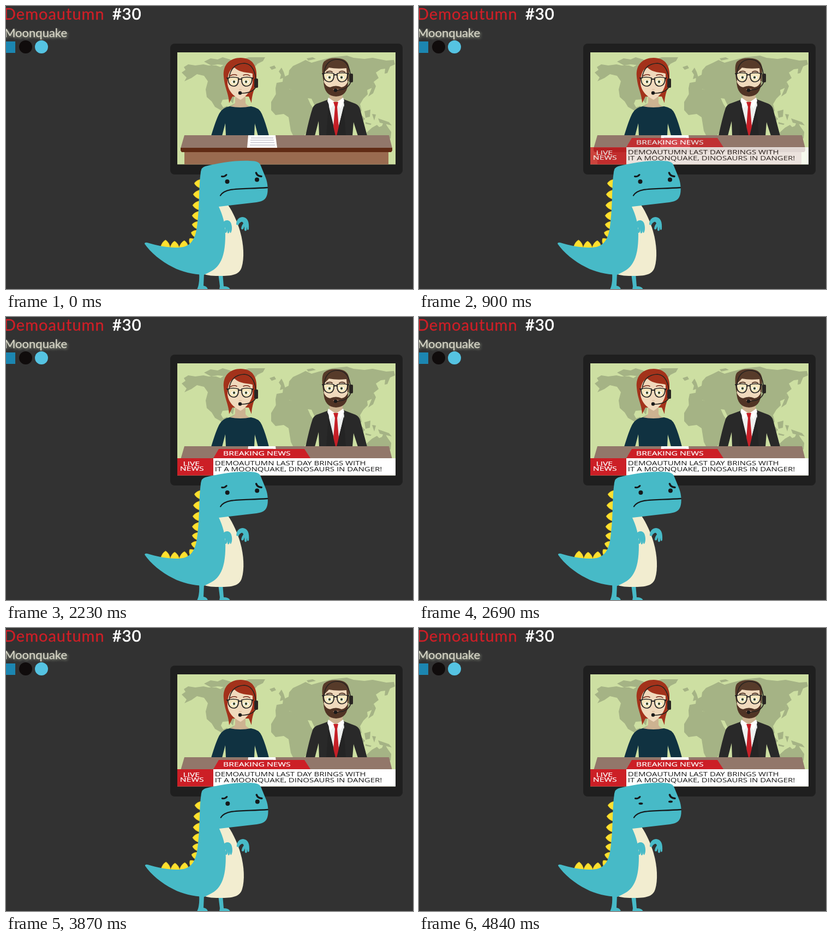
Write an HTML page that moves like this. It is 746 px wide and 519 px high and loops after 4.91 s.

```html
<!DOCTYPE html>
<html lang="en">
<head>
<meta charset="utf-8">
<title>Breaking news</title>
<style>
  html, body { margin: 0; height: 100%; overflow: hidden; background: #323232; }
  svg { display: block; width: 746px; height: 519px; }
  .head { font-family: Lato, sans-serif; }
  .sub { filter: drop-shadow(2px 2px 2px #8a8f80); }
  .news { font-family: "Open Sans", "Noto Sans", sans-serif; }
  .line { fill: none; stroke-linecap: round; stroke-linejoin: round; }
</style>
</head>
<body>
<svg viewBox="0 0 746 519">
  <defs>
    <clipPath id="screen"><path d="M314 85h400v205.500h-400z"/></clipPath>
    <g id="glasses">
      <g fill="#f5e6bd" stroke="#242323" stroke-width="1.700">
        <path d="M-22 -7q9 -3 19 0q1 14 -8 15q-11 0 -11 -15zM22 -7q-9 -3 -19 0q-1 14 8 15q11 0 11 -15z"/>
      </g>
      <path class="line" d="M-3 -4q3 -2 6 0M-22 -6l-2 -1M22 -6l2 -1" stroke="#242323" stroke-width="2"/>
      <g fill="#fff"><ellipse cx="-11" rx="5" ry="3"/><ellipse cx="11" rx="5" ry="3"/></g>
      <g fill="#55653c"><circle cx="-11" r="2.400"/><circle cx="11" r="2.400"/></g>
      <g fill="#222"><circle cx="-11" r="1.100"/><circle cx="11" r="1.100"/></g>
    </g>
  </defs>

  <g class="head">
    <text x="-4" y="24.500" font-size="29" letter-spacing="1" fill="#cf1f27" stroke="#cf1f27" stroke-width=".3">Demoautumn</text>
    <text x="195" y="24.500" font-size="29" letter-spacing="1" fill="#fff" stroke="#fff" stroke-width=".7">#30</text>
    <text class="sub" x="-3" y="57" font-size="22" fill="#d6d5c6" stroke="#d6d5c6" stroke-width=".3">Moonquake</text>
  </g>
  <path d="M-4 65h21v21h-21z" fill="#1c86b1"/>
  <circle cx="36" cy="75" r="12" fill="#100c0c"/>
  <circle cx="65" cy="75" r="12" fill="#55c3e2"/>

  <rect x="301" y="69" width="426" height="240" rx="8" fill="#1f1f1f"/>
  <g clip-path="url(#screen)">
    <path d="M314 85h400v206h-400z" fill="#cddfa2"/>
    <g fill="#a5b385">
      <path d="M322 122l7-5-3-5 8-5 13 2 15-2 9 2 14 0 8 3 6-4 18 4 8 12 22 3 6 8-13 8-9 4-6 11-7 10-2 11-7-8-12 1-3 7 4 7 8-3-1 8 10 7-6 3-12-8-14-8-6-10-9-8-2-14 4-15-7-10-13-3-10 7-13 6 4-7z"/>
      <path d="M363 102l12-6 13 2 9-4 14 4 10 8-15 3-18-2-12 2zM432 98l13-4 30 0-4 7-10 5-13 15-9-3-1-14z"/>
      <path d="M410 183l14-6 19 5 7 8 18 7-2 14-13 10-8 17-13 13-6-28-15-20z"/>
      <path d="M486 176l11-18 17-6 14 2 3 6 19 2 8 18 4 6 10 1-11 19-4 17-13 18-12 8-10-20-4-25-9-6-15 2-8-9z"/>
      <path d="M494 151l2-10 11-2 1-8 10-5 1-8 7-8 13-6 10-5 11 5 14-4 23-6 28-3 12 4 20 2 15-2 25 5 14-1 2 8-9 4-5 12-5 1 1-9-8 1-9 6 5 10-9 7-3 11-9 4 1 8-8 8-6 10 3 12-4 5-8-13-7-8-9 12-3 14-7-9-5-14-15-5-5 15-14 8-9-14-6-13-7-1-13-1-2-7-6 2-8-9-5-2 6 11-3 2-9-10-9 3-9 8z"/>
      <path d="M500 120l5-7 4 8 3 10-10 3 2-8zM483 112l9-3 3 5-8 3zM551 96l11-2 6 3-14 3zM671 149l3-10 4 8-5 13-9 6zM564 205l5 4-4 15-5 2z"/>
      <path d="M638 187l10 9 10 11-4 4-14-15zM657 193l11-3-1 13-8 2zM671 198l7 1-3 11zM682 206l20 7 5 6-22-5zM661 232l10-9 9-5 4 4 5-2 4-9 6 10 7 10-1 12h-44zM659 213l11 3-2 2-9-2z"/>
    </g>

    <!-- woman -->
    <path d="M409 178c-1-19-8-26-10-49c-2-22 12-34 31-34c21 0 31 14 29 37c-1 19-8 25-9 46l-5-12h-30z" fill="#a3321b"/>
    <path d="M420 163h19v15q3 6 12 7q-21 13-43 0q10-2 12-8z" fill="#cdb391"/>
    <path d="M406 133q1-17 13-20q8 9 33 10v18q-3 19-22 31q-21-10-24-29z" fill="#f0d9bc"/>
    <path d="M406 137q1-23 20-31q14 16 29 19l-1-14-16-12-20 2-13 14z" fill="#a3321b"/>
    <path d="M376 238q9-30 15-41q6-11 19-13q20 4 39 0q15 2 20 14q7 16 13 40h-20l-6-23-1 23h-52l-1-23-6 23z" fill="#103241"/>
    <use href="#glasses" x="429" y="139"/>
    <path class="line" d="M409 132q3-26 28-27q17 1 21 28M459 146q-5 14-28 14" stroke="#29251f" stroke-width="1.700"/>
    <rect x="455" y="133" width="7" height="17" rx="2" fill="#292522"/>
    <circle cx="429" cy="159.500" r="3.200" fill="#191919"/>
    <path class="line" d="M411 128q7-4 12-1M435 127q7-3 12 1" stroke="#732718" stroke-width="1.500"/>
    <path d="M427 153h5" stroke="#d9b293"/>

    <!-- man -->
    <path d="M581 133q-4-27 3-32q9-7 27-5q16 2 18 17l-1 25h-46z" fill="#573b2a"/>
    <path d="M593 155h24v19l-12 8-12-9z" fill="#cdb391"/>
    <path d="M583 122q5-5 9-9q14 3 32 1l2 25q-3 22-21 27q-20-6-22-27z" fill="#f0d9bc"/>
    <path d="M582 138q4 10 12 11q11-5 21 0q8-1 12-11q0 27-22 28q-22-1-23-28z" fill="#513425"/>
    <path d="M599 153q6-3 12 0q-6 4-12 0z" fill="#d29a83"/>
    <path d="M549 238q7-33 13-51q3-7 11-9l19-7 13 8 14-8 21 8q7 3 9 10l13 49h-17l-8-25-2 25h-61l-1-27-7 27z" fill="#292929"/>
    <path d="M591 170l13 10 14-10 2 12-15 56-13-53z" fill="#eef0ef"/>
    <path d="M591 168l13 9-9 11-6-14zM618 168l-13 9 8 11 7-14z" fill="#fff"/>
    <path d="M600 176h9l-2 9 4 49-6 5-6-5 4-49z" fill="#c51f27"/>
    <path d="M591 183l13 55h-17zM619 183l-13 55h17z" fill="#242424"/>
    <use href="#glasses" x="604" y="131"/>
    <path class="line" d="M583 124q2-24 22-26q22-1 26 26M632 139q-6 16-27 15" stroke="#292420" stroke-width="1.700"/>
    <rect x="629" y="124" width="7" height="16" rx="2" fill="#292522"/>
    <circle cx="604" cy="154.500" r="3.200" fill="#191919"/>
    <path class="line" d="M588 121q6-3 10 0M611 121q5-3 10 0" stroke="#513425" stroke-width="2"/>

    <path d="M327 266h374v25h-374z" fill="#996b50"/>
    <path d="M327 237h375l6 24h-388z" fill="#92776a"/>
    <path d="M320 260h388v5l-2 3h-384l-2-3z" fill="#602b15"/>
    <path d="M444 237h50l3 23h-55z" fill="#fff"/>
    <path d="M449 242h41M448 246h43M448 250.500h44M447 255h46" stroke="#c5c3cd" stroke-width="1.500"/>

    <g id="banner">
      <path d="M380 259h334v32h-334z" fill="#fff"/>
      <path d="M314 259h66l10-17h157l11 17h-178v32h-66z" fill="#cc1f26"/>
      <g class="news" transform="translate(314 0) scale(1.390 1)" font-size="10.800" fill="#171717">
        <text x="49.500" y="272.300">DEMOAUTUMN LAST DAY BRINGS WITH</text>
        <text x="49.500" y="282.600">IT A MOONQUAKE, DINOSAURS IN DANGER!</text>
        <g font-size="11.300" fill="#fff" stroke="#fff" stroke-width=".2">
          <text x="60.500" y="254.500">BREAKING NEWS</text>
          <text x="7.500" y="273">LIVE</text>
          <text x="3.500" y="281.700">NEWS</text>
        </g>
      </g>
    </g>
  </g>

  <g fill="#47bac7">
    <path d="M354 490h9l-1 23q7 1 8 7h-20l2-5q3-10 2-25zM389 490h8l2 24q10 0 12 6h-20l1-6z"/>
    <g id="body">
      <g id="spikes" fill="#ffe02e" stroke="#c9a820" stroke-width=".5"></g>
      <path d="M389 366l18-1c9 13 17 31 22 48c7 24 8 50 3 66c-4 12-13 16-37 16c-14 0-27 0-35-5z" fill="#f2edd0"/>
      <path d="M357 304q1-8 8-10c27-6 51-11 82-10c13 0 18 3 20 9l9 22c4 10 5 25 2 33c-3 8-8 10-19 12l-69 8c7 15 12 31 12 52c0 22-3 40-10 51c-6 11-16 16-29 22c-21-1-40-5-57-14c-22-11-41-27-52-43q0-3 5-2c22 7 53 12 69 7c17-6 21-24 23-45c4-33 2-64 6-92z"/>
      <path d="M397 398c4-7 14-7 16 2c2 7 1 13-1 16q-2 1-2-6q0 7-3 7q-2-1-1-8q-1 8-4 7q-2-2 0-9l-4-3zM422 401c0-9 5-14 12-14c9 1 12 9 11 22q-1 3-3 1l-1-5 0 6q-2 3-4 0l0-7-2 5q-3 2-4-1q1-6 4-9q-1-4-4-3q-4 2-5 6z"/>
      <g class="line" stroke="#15191b">
        <path d="M395.500 312.500q5 1 8.500-3" stroke-width="3"/>
        <path d="M458.500 306q2 6 9.500 6.500" stroke-width="3.600"/>
        <path d="M393 347.500c10-16 42-11 86-14.500" stroke-width="2.300"/>
      </g>
      <g fill="#15191b">
        <ellipse class="eye" cx="405.500" cy="322" rx="4" ry="4"/>
        <ellipse class="eye" cx="460" cy="318.500" rx="4" ry="4"/>
      </g>
    </g>
  </g>
</svg>
<script>
  const LOOP = 4910;
  const $ = id => document.getElementById(id);
  const eyes = document.querySelectorAll('.eye');

  // back spikes: x, y and tilt in degrees; tips point up before tilting
  const spikes = [[357, 326, -85], [355, 346, -87], [354, 366, -87], [353, 385, -87],
    [351, 402, -82], [349, 418, -75], [343, 434, -40], [326, 442, 5], [309, 443, 0], [292, 441, 2]];
  $('spikes').innerHTML = spikes.map(([x, y, a], i) => {
    const s = i > 3 && i < 7 ? .85 : 1;
    return `<path transform="translate(${x} ${y}) rotate(${a}) scale(${s})"
      d="M-9 2Q-6 -9 0 -12Q7 -8 9 2z"/>`;
  }).join('');

  // cubic-bezier(.25, .1, .25, 1)
  function ease(p) {
    if (p <= 0) return 0;
    if (p >= 1) return 1;
    let lo = 0, hi = 1, u;
    for (let i = 0; i < 20; i++) {
      u = (lo + hi) / 2;
      const x = .75 * u * (1 - u) + u ** 3;
      if (x < p) lo = u; else hi = u;
    }
    return .3 * u * (1 - u) ** 2 + 3 * u * u * (1 - u) + u ** 3;
  }

  function draw(now) {
    const t = now % LOOP;
    $('banner').setAttribute('opacity', ease((t - 395) / 1000));

    const sway = t < 970 ? 0 : (1 - Math.cos((t - 970) / 1100 * 2 * Math.PI)) / 2;
    $('body').setAttribute('transform', `translate(${sway} 0)`);

    const gap = Math.min(...[1300, 3095, 4890].map(c => Math.abs(t - c)));
    const open = Math.min(1, Math.max(.1, gap / 100));
    eyes.forEach(e => e.setAttribute('ry', 4 * open));
  }

  const start = performance.now();
  function tick() {
    draw(performance.now() - start);
    requestAnimationFrame(tick);
  }
  tick();
</script>
</body>
</html>
```
